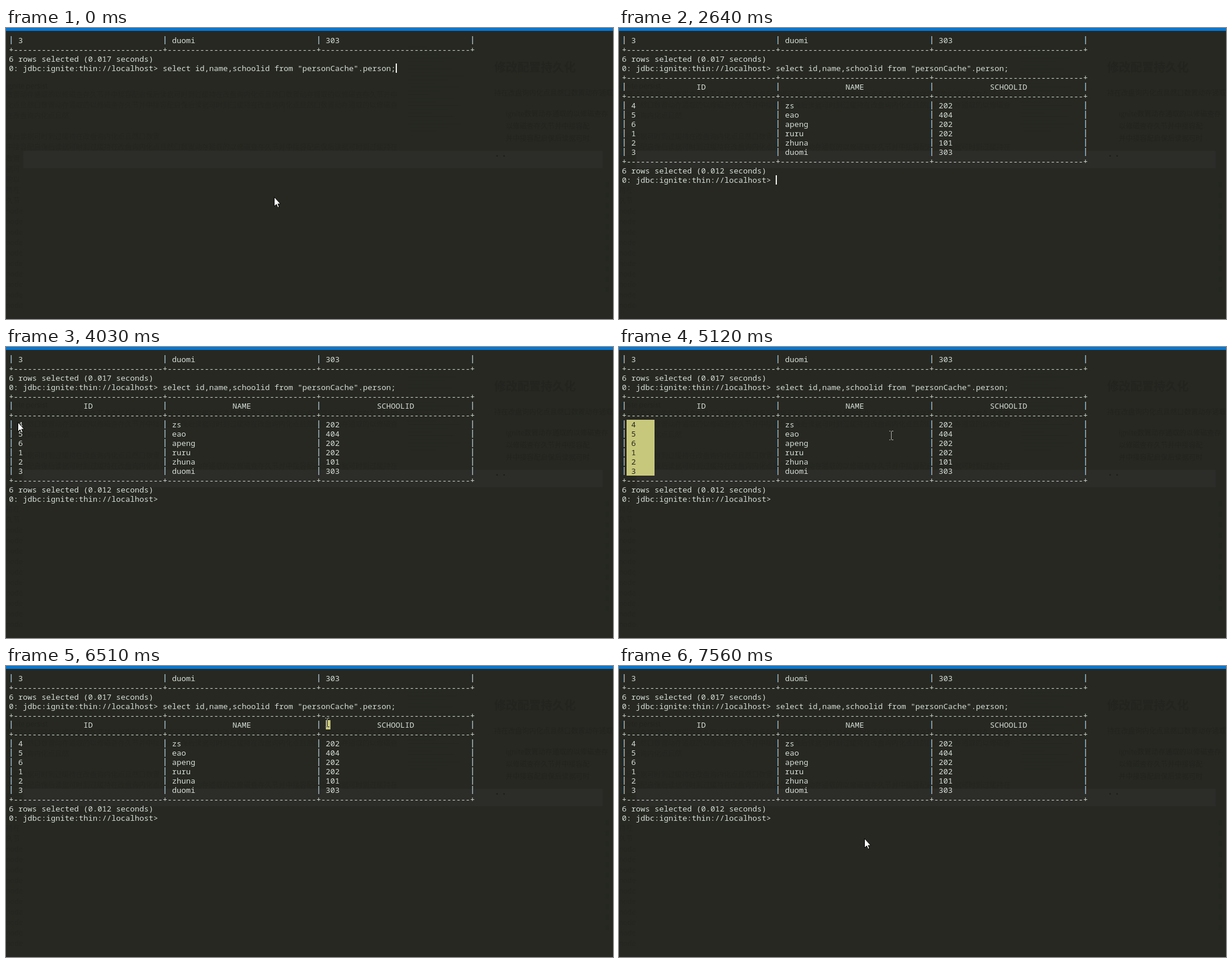
These frames come from a looping animation (1042x500 px, 8 s). An HTML page:

```html
<!DOCTYPE html>
<html lang="en">
<head>
<meta charset="utf-8">
<title>Terminal query</title>
<style>
html, body { margin: 0; width: 100%; height: 100%; overflow: hidden; background: #272822; }
#stage { position: relative; width: 1042px; height: 500px; overflow: hidden; background: #272822; }
#stage > * { position: absolute; left: 0; top: 0; }
#bar { width: 100%; height: 5px; background: #0078d7; }
#ghost { fill: #23241f; font: 12px "Noto Sans CJK SC", "Noto Sans CJK", sans-serif; }
pre {
  box-sizing: border-box; width: 1042px; height: 500px; margin: 0; padding: 13px 5px;
  font: 13.3333px/16px "Noto Sans Mono", monospace; color: #d4ddd6;
}
/* Column bars carry the colour fringe of subpixel text */
pre i {
  display: inline-block; width: 8px; height: 16px; vertical-align: top; color: transparent;
  background: linear-gradient(90deg, #62b0e6 1px, #a07850 1px) 3px 1px / 2px 14px no-repeat;
}
#picked { background: #c8c87c; color: #26271f; }
#caret { width: 2px; height: 16px; background: #f4f4f0; }
#pointer, #beam { overflow: visible; }
#beam { mix-blend-mode: difference; }
</style>
</head>
<body>
<div id="stage">
  <svg id="ghost" width="1042" height="500"></svg>
  <div id="bar"></div>
  <pre id="screen"></pre>
  <pre id="picked"></pre>
  <div id="caret"></div>
  <svg id="pointer" width="12" height="20"><path d="M.5.5V16.5L4.2 13L6.6 18.5L9 17.5L6.7 12.2H11.3Z" fill="#fff" stroke="#000"/></svg>
  <svg id="beam" width="1" height="1"><path d="M-3-7.5H-1M1-7.5H4M-3 7.5H-1M1 7.5H4M.5-7V7" fill="none" stroke="#d8d8d0"/></svg>
</div>
<script>
const LOOP = 8000, STEP = 140, BLINK = 530, CELL = 8, ROW = 16, LEFT = 5, TOP = 13;
const PRINTED = 1120, READY = 1240;
const $ = id => document.getElementById(id);

// Terminal text
const rule = "+" + ("-".repeat(32) + "+").repeat(3);
const bars = cells => "|" + cells.map(c => c.padEnd(32) + "|").join("");
const record = (...cells) => bars(cells.map(c => " " + c));
const heading = (...cells) => bars(cells.map(c => " ".repeat((32 - c.length) / 2) + c));
const prompt = "0: jdbc:ignite:thin://localhost> ";
const before = [
  record("3", "duomi", "303"), rule, "6 rows selected (0.017 seconds)",
  prompt + 'select id,name,schoolid from "personCache".person;'
];
const after = [
  ...before, rule, heading("ID", "NAME", "SCHOOLID"), rule,
  record("4", "zs", "202"), record("5", "eao", "404"), record("6", "apeng", "202"),
  record("1", "ruru", "202"), record("2", "zhuna", "101"), record("3", "duomi", "303"),
  rule, "6 rows selected (0.012 seconds)", prompt
];
const markup = lines => lines.join("\n").replace(/>/g, "&gt;").replace(/\|/g, "<i>|</i>");
const shortText = markup(before), fullText = markup(after);
$("picked").innerHTML = fullText;

// Faint page behind the translucent window
const words = "数据的持久化配置可以在节点启动时修改并且保存到磁盘中然后通过查询接口读取缓存内容";
const han = (n, k) => Array.from({ length: n }, (_, i) => words[(i * 7 + k) % words.length]).join("");
const label = (x, y, s, more = "") => `<text x="${x}" y="${y}" ${more}>${s}</text>`;
const block = (x, y, w, h) => `<rect x="${x}" y="${y}" width="${w}" height="${h}" opacity=".5"/>`;
let ghost = '<rect x="30" y="211" width="994" height="30" fill="#2c2c29"/>';
ghost += label(0, 104, "ignite persist") + label(838, 116, han(17, 3));
ghost += label(838, 75, "修改配置持久化", 'font-size="20" font-weight="700"');
ghost += label(837, 225, "••", 'fill="#191a17"');
[56, 56, 9, 0, 22, 56].forEach((n, k) => ghost += label(0, 119 + k * 18, han(n, k * 5), 'opacity=".6"'));
for (let k = 0; k < 3; k++) ghost += label(858, 152 + k * 21, (k ? "" : "ignite") + han(12, k * 9));
for (let k = 0; k < 15; k++) ghost += label(0, 229 + k * 18, k < 5 ? han(2, k) : "node", 'opacity=".6"');
for (let k = 0; k < 24; k++) ghost += block(688 + k % 3 * 3, 32 + k * 6.3, 35 + k * 37 % 60, 1);
for (let k = 0; k < 11; k++) ghost += block(1029, 265 + k * 18, 6, 9);
$("ghost").innerHTML = ghost;

// Pointer: key points joined by straight moves, shown once per STEP
const path = [
  { t: 1540, x: 460, y: 290 }, { t: 1820, x: 546, y: 238 }, { t: 2520, x: 237, y: 153 },
  { t: 2800, x: 232, y: 165 }, { t: 3780, x: 20, y: 129 }, { t: 4060, x: 20, y: 129 },
  { t: 4340, x: 59, y: 215 }, { t: 4620, x: 59, y: 220 }, { t: 5320, x: 739, y: 106 },
  { t: 6160, x: 567, y: 115 }, { t: 6300, x: 567, y: 115 }, { t: 6440, x: 551, y: 97 },
  { t: 6720, x: 719, y: 218 }, { t: 7000, x: 719, y: 218 }, { t: 7280, x: 545, y: 335 },
  { t: 7560, x: 421, y: 296 }
];
function pointerAt(time) {
  const t = Math.floor(time / STEP) * STEP;
  const i = path.findIndex(p => p.t > t);
  if (i < 1) return path.at(i);
  const a = path[i - 1], b = path[i], k = (t - a.t) / (b.t - a.t);
  return { x: Math.round(a.x + (b.x - a.x) * k), y: Math.round(a.y + (b.y - a.y) * k) };
}
const within = (t, from, to) => t >= from && t < to;
const hidden = t => within(t, 2600, 2770) || within(t, 6900, 7140);

// Block selections stretch from an anchor cell to the pointer
const drags = [
  { col: 1, row: 7, from: 4200, to: 4440, clear: 5780 },
  { col: 68, row: 5, from: 6440, to: 6780, clear: 7170 }
];

// The caret's clock restarts with each prompt and stands still during a selection
function caretOn(t) {
  if (t < PRINTED) return Math.floor((t + 410) / 560) % 2 === 0;
  const [first, second] = drags;
  const paused = Math.max(0, Math.min(t, first.clear) - first.from);
  return within(t, READY, second.from) && Math.floor((t - READY - paused) / BLINK) % 2 === 0;
}

const show = (el, on) => el.style.visibility = on ? "visible" : "hidden";
const place = (el, x, y) => el.style.transform = `translate(${x}px,${y}px)`;
const cellEnd = (v, origin, size) => origin + (Math.floor((v - origin) / size) + 1) * size;
let printed = null;

function draw(t) {
  const full = t >= PRINTED;
  if (full !== printed) $("screen").innerHTML = (printed = full) ? fullText : shortText;

  show($("caret"), caretOn(t));
  place($("caret"), full ? 269 : 669, full ? 253 : 61);

  const drag = drags.find(d => within(t, d.from, d.clear));
  show($("picked"), drag);
  if (drag) {
    const { x, y } = pointerAt(Math.min(t, drag.to));
    const right = 1042 - cellEnd(x, LEFT, CELL), bottom = 500 - cellEnd(y, TOP, ROW);
    $("picked").style.clipPath =
      `inset(${TOP + drag.row * ROW}px ${right}px ${bottom}px ${LEFT + drag.col * CELL}px)`;
  }

  const { x, y } = pointerAt(t), text = within(t, drags[0].from, drags[1].clear - 30);
  show($("pointer"), !text && !hidden(t));
  show($("beam"), text && !hidden(t));
  place($(text ? "beam" : "pointer"), x, y);
}

const start = performance.now();
function tick() {
  draw((performance.now() - start) % LOOP);
  requestAnimationFrame(tick);
}
tick();
</script>
</body>
</html>
```
